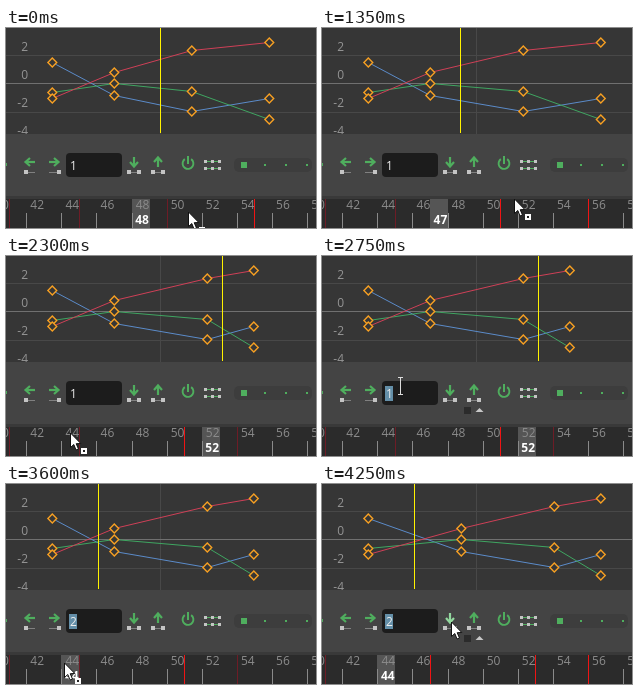
An HTML page with a canvas for the animation above (4300 ms loop, 310 px wide and 200 px high).

```html
<!DOCTYPE html>
<html lang="en">
<head>
<meta charset="utf-8">
<title>Retiming keys</title>
<style>
html, body { margin: 0; width: 100%; height: 100%; overflow: hidden; background: #444; }
canvas { display: block; }
</style>
</head>
<body>
<canvas id="stage" width="310" height="200"></canvas>
<script>
const g = document.getElementById('stage').getContext('2d');
const LOOP = 4300, STEP = 50;
const GREEN = '#4fae5e', PALE = '#c4c4c4';
const FONT = '"Open Sans", "Noto Sans", sans-serif';

const graphX = n => 154.3 + 15.5 * (n - 48);
const timeX = n => 126 + 17.55 * (n - 48);

// Playhead clicks: time, frame
const clicks = [[0, 48], [250, 47], [1550, 52], [3550, 44]];
// Button presses: every key after the playhead moves by this many frames
const shifts = [[900, 1], [2000, -1], [2100, -1], [4150, 2]];

// Pointer moves: start, end, destination
const DOWN = [129, 138], UP = [152, 138], FIELD = [78, 130];
const moves = [
  [50, 250, [118, 184]], [300, 550, DOWN],
  [1250, 1420, [205, 178]], [1600, 1850, UP],
  [2150, 2300, [64, 177]], [2400, 2650, FIELD],
  [3050, 3250, [115, 183]], [3300, 3550, [58, 179]], [3650, 4000, DOWN]
];

const curves = [
  ['#5b8bc9', [34, 67, 83, 70]],
  ['#3fa561', [64, 55, 63, 91]],
  ['#cf4057', [70, 44, 22, 14]]
];

const playhead = t => clicks.filter(c => c[0] <= t).pop()[1];

function keysAt(t) {
  let keys = [41, 45, 50, 55];
  for (const [at, by] of shifts) {
    if (at <= t) keys = keys.map(n => n > playhead(at) ? n + by : n);
  }
  return keys;
}

function pointer(t) {
  let p = [182, 184];
  for (const [from, to, goal] of moves) {
    const u = Math.min(1, Math.max(0, (t - from) / (to - from)));
    const ease = 1 - (1 - u) ** 2;
    p = p.map((v, i) => v + (goal[i] - v) * ease);
  }
  return p;
}

function box(x, y, w, h, color) {
  g.fillStyle = color;
  g.fillRect(x, y, w, h);
}

function text(s, x, y, color, align = 'left', weight = 500) {
  g.font = `${weight} 12px ${FONT}`;
  g.textAlign = align;
  g.fillStyle = color;
  g.fillText(s, x, y);
}

function pill(x, y, w, h, r, color) {
  g.fillStyle = color;
  g.beginPath();
  g.roundRect(x, y, w, h, r);
  g.fill();
}

function shape(points, close) {
  g.beginPath();
  points.forEach(p => g.lineTo(p[0], p[1]));
  if (close) g.closePath();
}

function drawGraph(keys, now) {
  g.save();
  g.beginPath();
  g.rect(0, 0, 310, 106);
  g.clip();
  box(0, 0, 310, 106, '#363636');
  for (const y of [27, 84]) box(0, y, 310, 1, '#484848');
  box(154, 0, 1, 106, '#484848');
  box(0, 55, 310, 1, '#707070');
  [2, 0, -2, -4].forEach((n, i) => text(n, 22, 23 + 28 * i, '#949494', 'right'));

  g.translate(0.5, 0.5);
  const xs = keys.map(graphX);
  for (const [color, ys] of curves) {
    g.strokeStyle = color;
    g.lineWidth = 1;
    shape(xs.map((x, i) => [x, ys[i]]));
    g.stroke();
  }
  box(Math.floor(graphX(now)) - 0.5, -0.5, 1, 105, '#fff200');
  g.strokeStyle = '#f7a023';
  g.lineWidth = 1.4;
  g.fillStyle = '#363636';
  for (const [, ys] of curves) {
    ys.forEach((y, i) => {
      const x = xs[i], r = 4.4;
      shape([[x, y - r], [x + r, y], [x, y + r], [x - r, y]], true);
      g.fill();
      g.stroke();
    });
  }
  g.restore();
}

function button(x, angle, hot, dots) {
  g.save();
  g.translate(x, 134);
  g.rotate(angle);
  g.strokeStyle = hot ? '#92d89e' : GREEN;
  g.lineWidth = 2.2;
  shape([[-5, 0], [4, 0]]);
  g.stroke();
  shape([[0, -4], [4.5, 0], [0, 4]]);
  g.stroke();
  g.restore();
  box(x - 5, 144, 10, 1, '#808080');
  for (const d of dots) box(x + d, 142, 4, 4, PALE);
}

function drawTools(value, selected, px, py) {
  box(0, 106, 310, 65, '#444');
  box(0, 168, 310, 3, '#393939');
  box(0, 135, 1, 3, GREEN);
  const inRow = py > 124 && py < 158;
  const over = x => inRow && Math.abs(px - x) < 10;
  button(24, Math.PI, over(24), [-6]);
  button(48, 0, over(48), [3]);
  button(128, Math.PI / 2, over(128), [-7, 3]);
  button(152, -Math.PI / 2, over(152), [-7, 3]);

  pill(60, 125, 56, 24, 4, '#1c1c1c');
  if (selected) box(63, 130, 8, 15, '#648fa8');
  text(value, 64, 142, '#eee');

  if (inRow && px > 60 && px < 165) {
    box(142, 151, 7, 7, '#2b2b2b');
    g.fillStyle = '#c8c8c8';
    shape([[153.5, 156], [157.5, 152], [161.5, 156]], true);
    g.fill();
  }

  g.strokeStyle = GREEN;
  g.lineWidth = 1.9;
  g.beginPath();
  g.arc(182, 135.5, 5.4, -0.95, Math.PI + 0.95);
  g.stroke();
  box(181, 128, 2, 8, GREEN);

  for (const y of [133, 140]) {
    box(199, y, 15, 1, GREEN);
    for (const x of [198, 205, 212]) box(x, y - 1, 3, 3, PALE);
  }
  pill(228, 130, 78, 14, 5, '#3d3d3d');
  box(235, 134, 6, 6, GREEN);
  for (const x of [258, 279, 300]) box(x, 136, 2, 2, GREEN);
}

function drawTimeline(keys, now) {
  box(0, 171, 310, 29, '#2b2b2b');
  box(Math.floor(timeX(now)), 171, 18, 29, '#555');
  for (let n = 40; n <= 58; n += 2) {
    box(Math.floor(timeX(n)), 185, 1, 15, '#8a8a8a');
    text(n, timeX(n) + 10.5, 181, '#8c8c8c', 'center');
  }
  // Thin lines look strong or faint by where they fall between pixels
  for (const n of keys) {
    const x = timeX(n);
    box(Math.floor(x), 171, 1, 29, x % 1 > 0.38 ? '#f01414' : '#6e1c26');
  }
  text(now, timeX(now) + 10, 196, '#fff', 'center', 700);
}

function drawPointer(x, y) {
  g.save();
  g.translate(Math.round(x), Math.round(y));
  if (y > 124 && y < 149 && x > 61 && x < 115) {
    box(0, -8, 1, 16, '#ddd');
    for (const end of [-9, 8]) box(-2, end, 5, 1, '#ddd');
  } else {
    g.fillStyle = '#fff';
    g.strokeStyle = '#111';
    g.lineWidth = 1;
    shape([[0.5, 0], [0.5, 14.5], [3.8, 11.5], [6, 17], [8.5, 16], [6.2, 10.7], [10.8, 10.5]], true);
    g.fill();
    g.stroke();
    if (y > 165) {
      box(11, 15, 6, 6, '#fff');
      box(13, 17, 2, 2, '#222');
    }
  }
  g.restore();
}

function draw(ms) {
  const t = Math.floor(ms % LOOP / STEP) * STEP;
  const keys = keysAt(t), now = playhead(t);
  const [px, py] = pointer(t);
  drawGraph(keys, now);
  drawTools(t < 2950 ? '1' : '2', t >= 2750, px, py);
  drawTimeline(keys, now);
  drawPointer(px, py);
}

const start = performance.now();
function tick() {
  draw(performance.now() - start);
  requestAnimationFrame(tick);
}
tick();
</script>
</body>
</html>
```
